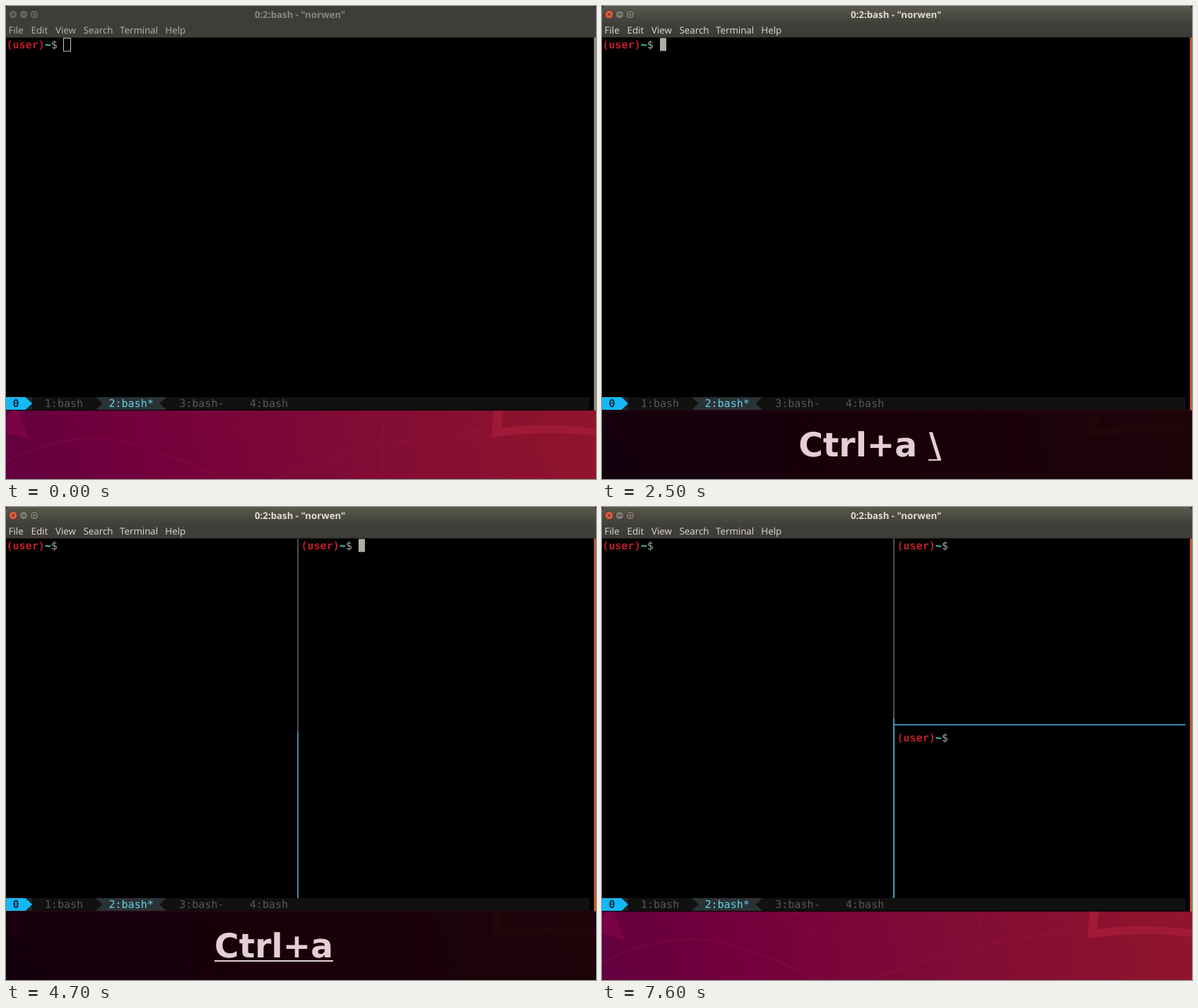
These frames come from a looping animation (835x670 px, 8000 ms). An HTML page:

```html
<!DOCTYPE html>
<html lang="en">
<head>
<meta charset="utf-8">
<title>Terminal panes</title>
<style>
html, body { margin: 0; width: 100%; height: 100%; overflow: hidden; background: #000; }
svg { display: block; width: 835px; height: 670px; }
text { white-space: pre; text-rendering: geometricPrecision; }
.ui { font: 13.35px "Open Sans", "Noto Sans", sans-serif; }
.title { font-weight: 700; font-size: 13.25px; }
.mono { font: 15.06px "DejaVu Sans Mono", monospace; }
.b { font-weight: 700; }
.keys { font: 700 47.2px "DejaVu Sans", sans-serif; fill: #e3d0d4; }

/* every timed part runs on the same 8 s clock with hard steps */
.t { opacity: 0; animation: 8s step-end infinite; }
.idle { animation-name: idle; opacity: 0; }
.hollow { animation-name: hollow; }
.cursor { animation-name: blink, hop; }
.split1 { animation-name: split1; }
.prompt2 { animation-name: prompt2; }
.split2 { animation-name: split2; }
.prompt3 { animation-name: prompt3; }
.bar { animation-name: bar; }
.prefix { animation-name: prefix; }
.prefix-line { animation-name: prefix-line; }
.slash { animation-name: slash; }
.slash-line { animation-name: slash-line; }
.dash { animation-name: dash; }
.dash-line { animation-name: dash-line; }

@keyframes idle { 0% { opacity: 1 } 5% { opacity: .5 } 6.25% { opacity: 0 } }
@keyframes hollow { 0% { opacity: 1 } 5% { opacity: 0 } }
@keyframes blink {
  5%, 16.25%, 31.25%, 46.25%, 57.5%, 72.5%, 92.5% { opacity: 1 }
  0%, 15%, 25%, 38.75%, 53.75%, 66.25%, 81.25%, 95% { opacity: 0 }
}
@keyframes hop {
  0% { transform: translate(0, 0) }
  33.75% { transform: translate(335px, 0) }
  37.5% { transform: translate(417px, 0) }
  75% { transform: translate(335px, 272px) }
  76.25% { transform: translate(417px, 272px) }
}
@keyframes split1 { 33.75% { opacity: 1 } }
@keyframes prompt2 { 37.5% { opacity: 1 } }
@keyframes split2 { 75% { opacity: 1 } }
@keyframes prompt3 { 76.25% { opacity: 1 } }
@keyframes bar { 17.5%, 58.75% { opacity: 1 } 51.25%, 92.5% { opacity: 0 } }
@keyframes prefix { 17.5%, 58.75% { opacity: 1 } 31.25%, 72.5% { opacity: 0 } }
@keyframes prefix-line { 17.5%, 58.75% { opacity: 1 } 20%, 61.25% { opacity: 0 } }
@keyframes slash { 31.25% { opacity: 1 } 51.25% { opacity: 0 } }
@keyframes slash-line { 31.25% { opacity: 1 } 33.75% { opacity: 0 } }
@keyframes dash { 72.5% { opacity: 1 } 92.5% { opacity: 0 } }
@keyframes dash-line { 72.5% { opacity: 1 } 75% { opacity: 0 } }
</style>
</head>
<body>
<svg viewBox="0 0 835 670">
  <defs>
    <linearGradient id="desk" gradientUnits="userSpaceOnUse" x1="0" y1="690" x2="810" y2="540">
      <stop offset="0" stop-color="#62003f"/>
      <stop offset=".25" stop-color="#74003c"/>
      <stop offset=".55" stop-color="#7f0a37"/>
      <stop offset="1" stop-color="#90142c"/>
    </linearGradient>
    <linearGradient id="chrome" x1="0" y1="0" x2="0" y2="1">
      <stop offset="0" stop-color="#5a594d"/>
      <stop offset=".55" stop-color="#403f39"/>
      <stop offset="1" stop-color="#3c3b37"/>
    </linearGradient>
    <g id="prompt" class="mono">
      <text x=".4" y="60"><tspan class="b" fill="#c01c28">(user)</tspan><tspan class="b" fill="#48dccf">~</tspan><tspan fill="#a9a9a5">$</tspan></text>
    </g>
    <g id="menu" class="ui">
      <text x="3.5" y="39">File</text>
      <text x="35.5" y="39">Edit</text>
      <text x="70" y="39">View</text>
      <text x="109.5" y="39">Search</text>
      <text x="161" y="39">Terminal</text>
      <text x="225.3" y="39">Help</text>
      <text class="title" x="352" y="16.5">0:2:bash - "norwen"</text>
    </g>
    <g id="marks" fill="none" stroke="#35342f">
      <path d="M7.8 9.8l4.4 4.4m0-4.4l-4.4 4.4M22 12h6M37.7 9.7h4.6v4.6h-4.6z"/>
    </g>
  </defs>

  <!-- desktop -->
  <rect width="835" height="670" fill="url(#desk)"/>
  <g fill="none" stroke="#b0284e" stroke-opacity=".16" stroke-width="2">
    <path d="M537 573Q530 620 533 670M270 573L307 610M0 645Q60 615 120 612T307 670M380 670Q520 612 688 600"/>
  </g>
  <path d="M0 583L7 573H17L33 614L0 604Z" fill="#86044c" opacity=".65"/>
  <path d="M690 573H703L701 598Q770 589 835 599V609Q765 600 687 611Z" fill="#a01a38"/>

  <!-- window -->
  <rect width="835" height="6" fill="#4a0a22"/>
  <path d="M0 45V5Q0 0 5 0H830Q835 0 835 5V45Z" fill="url(#chrome)"/>
  <g stroke="#35342f">
    <circle cx="10" cy="12" r="6" fill="#e2593c"/>
    <circle cx="25" cy="12" r="6" fill="#7b796e"/>
    <circle cx="40" cy="12" r="6" fill="#7b796e"/>
  </g>
  <use href="#marks"/>
  <use href="#menu" fill="#dfdbd2"/>
  <rect y="44.5" width="835" height="528.5" fill="#000"/>
  <rect x="832" y="44.5" width="3" height="528.5" fill="#bd5a33"/>

  <g class="t idle">
    <path d="M0 44.5V5Q0 0 5 0H830Q835 0 835 5V44.5Z" fill="#3e3d38"/>
    <g fill="#66645c" stroke="#35342f">
      <circle cx="10" cy="12" r="6"/>
      <circle cx="25" cy="12" r="6"/>
      <circle cx="40" cy="12" r="6"/>
    </g>
    <use href="#marks"/>
    <use href="#menu" fill="#b5b2aa"/>
    <rect x="340" y="2" width="160" height="20" fill="#3e3d38"/>
    <text class="ui title" x="352" y="16.5" fill="#8a877f">0:2:bash - "norwen"</text>
    <rect x="832" y="44.5" width="3" height="528.5" fill="#8b8a82"/>
  </g>

  <!-- panes -->
  <use href="#prompt"/>
  <g class="t split1">
    <rect x="412.3" y="45" width="1.6" height="273" fill="#626262"/>
    <rect x="412.3" y="318" width="1.6" height="236" fill="#58a0cc"/>
  </g>
  <g class="t split2" fill="#45a6cc">
    <rect x="412.3" y="299.5" width="1.6" height="254.5"/>
    <rect x="413" y="307.6" width="413" height="1.7"/>
  </g>
  <g class="t prompt2"><use href="#prompt" x="417"/></g>
  <g class="t prompt3"><use href="#prompt" x="417" y="272"/></g>
  <rect class="t hollow" x="81.5" y="45.5" width="10" height="18.5" fill="none" stroke="#c4c4c0"/>
  <rect class="t cursor" x="82" y="45.3" width="9" height="18.4" fill="#afaca6"/>

  <!-- status line -->
  <rect y="554" width="826" height="18" fill="#11110f"/>
  <rect x="27" y="554" width="9.5" height="18" fill="#24282a"/>
  <path d="M0 554H27.5L37 563L27.5 572H0Z" fill="#14b8f5"/>
  <path d="M127 554H227L217.5 563L227 572H127L136.500 563Z" fill="#2b3235"/>
  <g class="mono" fill="#575757">
    <text class="b" x="9.4" y="568" fill="#082c40">0</text>
    <text x="54.8" y="568">1:bash</text>
    <text x="145.4" y="568" fill="#62d2ea">2:bash*</text>
    <text x="245.2" y="568">3:bash-</text>
    <text x="344.9" y="568">4:bash</text>
  </g>

  <!-- pressed keys -->
  <g class="t bar">
    <rect y="573" width="835" height="97" fill="#000" fill-opacity=".8"/>
    <rect y="572.500" width="835" height="1" fill="#3a0c1c"/>
    <g class="keys">
      <text class="t prefix" x="295" y="638">Ctrl+a</text>
      <rect class="t prefix-line" x="295" y="642" width="168" height="2"/>
      <text class="t slash" x="278.200" y="638">Ctrl+a \</text>
      <rect class="t slash-line" x="462" y="642" width="18" height="2"/>
      <text class="t dash" x="277" y="638">Ctrl+a -</text>
      <rect class="t dash-line" x="461" y="642" width="19" height="2"/>
    </g>
  </g>
</svg>
</body>
</html>
```
